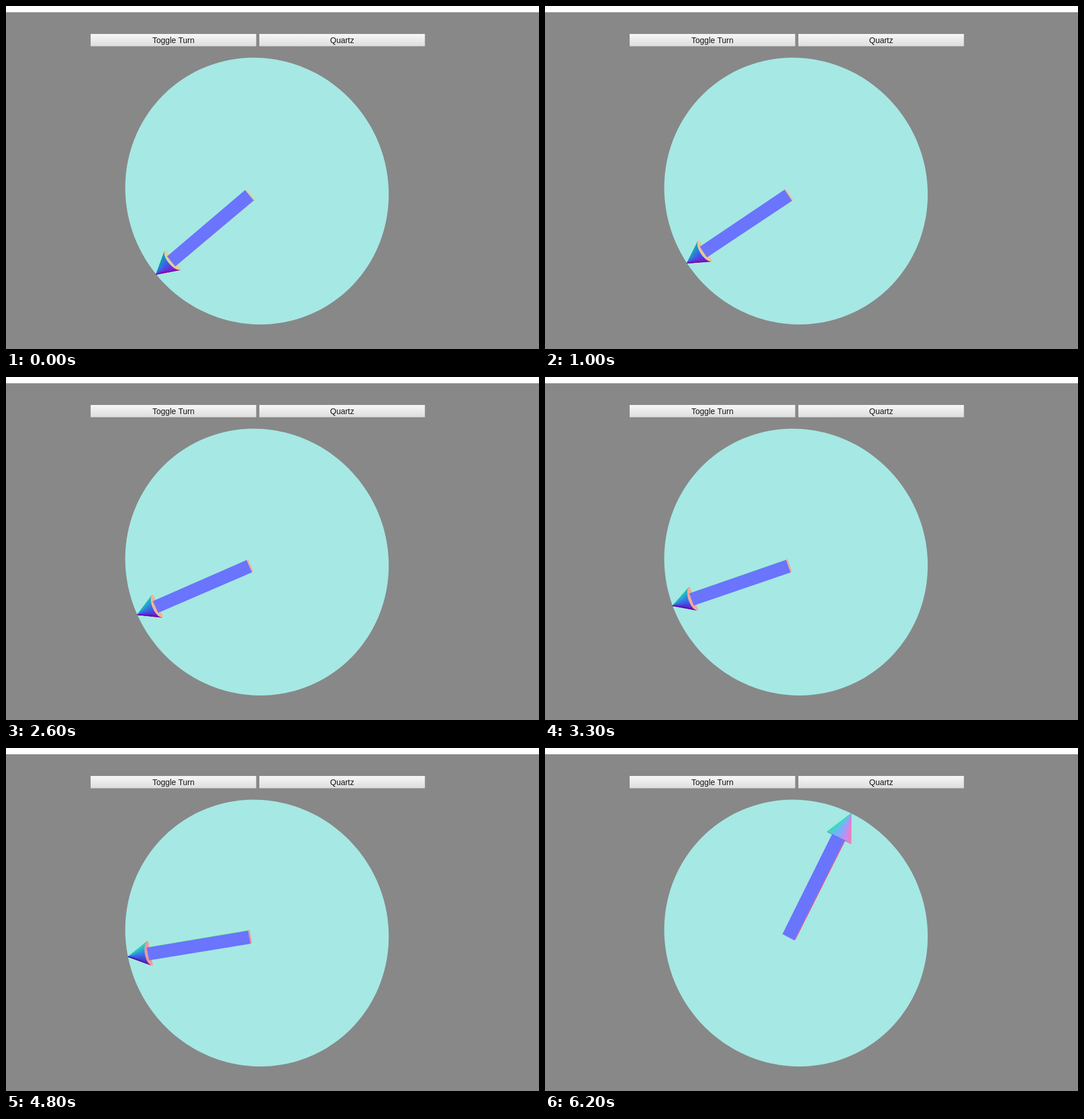
An HTML page with a canvas for the animation above (6.3 s loop, 932 by 601 pixels).

```html
<!DOCTYPE html>
<html lang="en">
<head>
<meta charset="utf-8">
<title>Turning hand</title>
<style>
  html, body { margin: 0; width: 100%; height: 100%; overflow: hidden; background: #888; }
  canvas { display: block; }
</style>
</head>
<body>
<canvas id="stage" width="932" height="601"></canvas>
<script>
const ctx = document.getElementById('stage').getContext('2d');
const LOOP = 6300, STEP = 100, JUMP = 6200;
const RADIUS = 235, HALF = 11.6, CONE_R = 22.8, CONE_L = 45, BASE = RADIUS - CONE_L;

// View space: y up, z towards the eye, disk centre at ORIGIN.
const EYE = [0, 0, 842], ORIGIN = [-38, -30, 0], VANISH = [466, 300];

const dot = (a, b) => a[0] * b[0] + a[1] * b[1] + a[2] * b[2];
const scale = (a, k) => a.map(c => c * k);
const sum = (...vs) => vs.reduce((a, b) => a.map((c, i) => c + b[i]));
const unit = a => scale(a, 1 / Math.hypot(...a));
const cross = (a, b) => [
  a[1] * b[2] - a[2] * b[1],
  a[2] * b[0] - a[0] * b[2],
  a[0] * b[1] - a[1] * b[0]
];

const up = unit([-0.17, -0.09, 0.981]);
const right = unit([up[2], 0, -up[0]]);
const back = cross(up, right);

function project([x, y, z]) {
  const k = EYE[2] / (EYE[2] - z);
  return [VANISH[0] + x * k, VANISH[1] - y * k];
}

function trace(points) {
  ctx.beginPath();
  points.forEach(p => ctx.lineTo(...project(p)));
  ctx.closePath();
}

const normalColor = n => `rgb(${n.map(c => Math.round(127.5 + 127.5 * c)).join(',')})`;
const facesEye = (point, normal) => dot(normal, sum(EYE, scale(point, -1))) > 0;

function face(points, normal, seam = 0) {
  if (!facesEye(points[0], normal)) return;
  trace(points);
  ctx.fillStyle = ctx.strokeStyle = normalColor(normal);
  ctx.fill();
  if (seam) {
    ctx.lineWidth = seam;
    ctx.stroke();
  }
}

function drawArrow(degrees) {
  const phi = degrees * Math.PI / 180;
  const axis = sum(scale(right, Math.cos(phi)), scale(back, Math.sin(phi)));
  const side = cross(axis, up);
  const tail = scale(axis, -1);
  const at = (x, y, z) => sum(ORIGIN, scale(axis, x), scale(side, y), scale(up, z));
  const rim = a => at(BASE, CONE_R * Math.cos(a), CONE_R * Math.sin(a));
  const baseShown = facesEye(at(BASE, 0, 0), tail);

  function shaft() {
    const h = HALF;
    face([at(0, -h, 0), at(0, h, 0), at(0, h, h), at(0, -h, h)], tail);
    for (const s of [-1, 1]) {
      face([at(0, s * h, 0), at(BASE, s * h, 0), at(BASE, s * h, h), at(0, s * h, h)], scale(side, s));
    }
    face([at(0, -h, h), at(BASE, -h, h), at(BASE, h, h), at(0, h, h)], up);
  }

  function cone() {
    const strips = 32, step = Math.PI / strips, tip = at(RADIUS, 0, 0);
    for (let i = 0; i < strips; i++) {
      const mid = (i + 0.5) * step;
      const normal = unit(sum(
        scale(side, CONE_L * Math.cos(mid)),
        scale(up, CONE_L * Math.sin(mid)),
        scale(axis, CONE_R)
      ));
      face([tip, rim(i * step), rim((i + 1) * step)], normal, 0.5);
    }
    const arc = Array.from({ length: strips + 1 }, (_, i) => rim(i * step));
    face(arc, tail);
  }

  function baseEdge() {
    trace([rim(0), rim(Math.PI)]);
    ctx.setLineDash([1.5, 1]);
    ctx.lineWidth = 1.2;
    ctx.strokeStyle = '#1c1440';
    ctx.stroke();
    ctx.setLineDash([]);
  }

  if (baseShown) {
    cone();
    shaft();
  } else {
    shaft();
    cone();
    baseEdge();
  }
}

function drawDisk() {
  const n = 180;
  trace(Array.from({ length: n }, (_, i) => {
    const a = i * 2 * Math.PI / n;
    return sum(ORIGIN, scale(right, RADIUS * Math.cos(a)), scale(back, RADIUS * Math.sin(a)));
  }));
  ctx.fillStyle = '#a6e8e4';
  ctx.fill();
}

function drawButton(x, label) {
  const y = 49, w = 289.5, h = 21.5;
  const shade = ctx.createLinearGradient(0, y, 0, y + h);
  shade.addColorStop(0, '#f7f7f7');
  shade.addColorStop(1, '#dddddd');
  ctx.fillStyle = shade;
  ctx.fillRect(x, y, w, h);
  ctx.fillStyle = '#111';
  ctx.font = '14px "Liberation Sans", Arial, sans-serif';
  ctx.textAlign = 'center';
  ctx.fillText(label, x + w / 2, 64.5);
}

function frame(now) {
  const t = Math.floor(now % LOOP / STEP) * STEP;
  ctx.fillStyle = '#888';
  ctx.fillRect(0, 0, 932, 601);
  ctx.fillStyle = '#fff';
  ctx.fillRect(0, 0, 932, 11);
  drawButton(148, 'Toggle Turn');
  drawButton(443, 'Quartz');
  drawDisk();
  drawArrow(t < JUMP ? 219.6 - 6.25 * t / 1000 : 62.3);
}

const start = performance.now();
function tick() {
  frame(performance.now() - start);
  requestAnimationFrame(tick);
}
tick();
</script>
</body>
</html>
```
